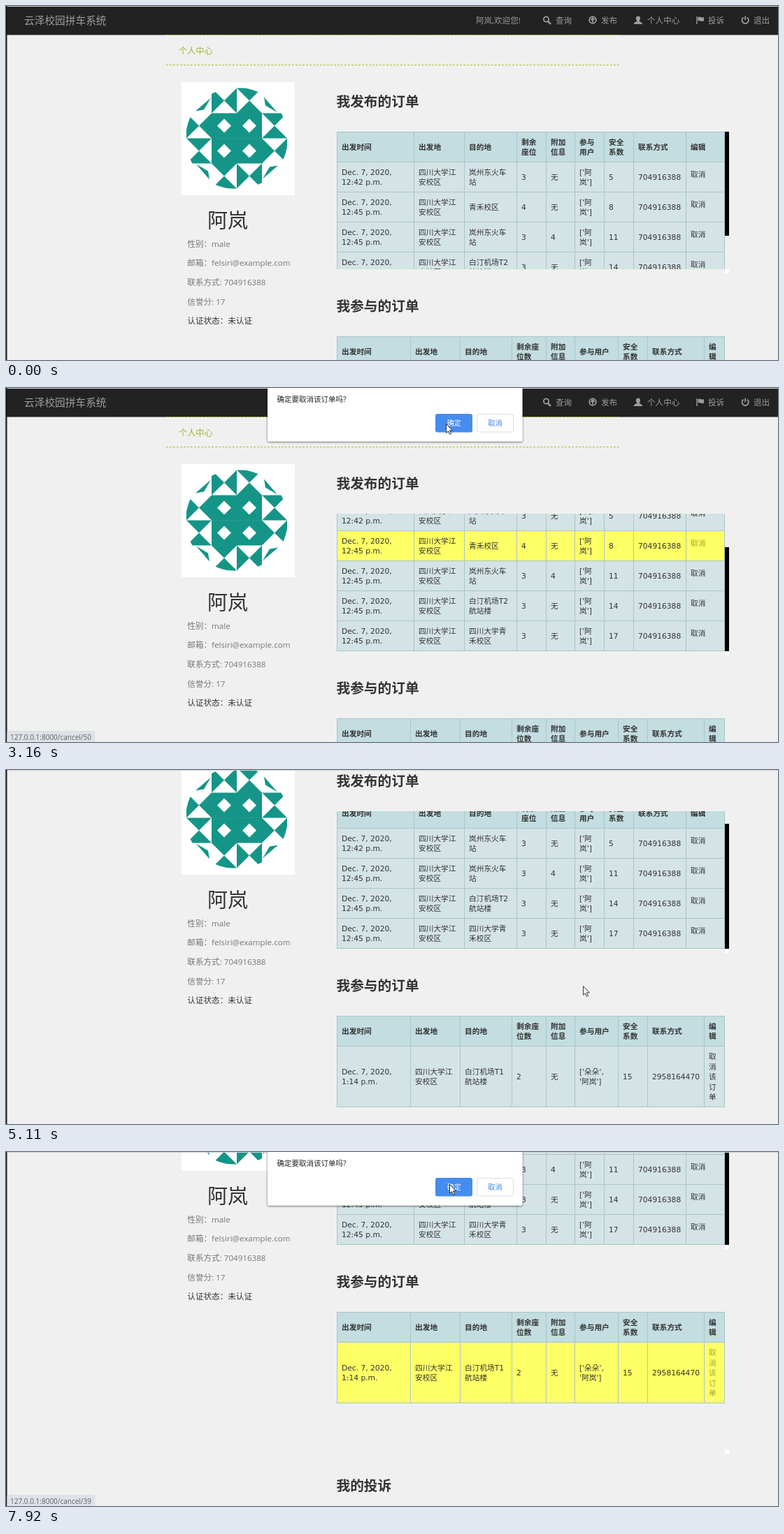
An HTML page for the animation above (8 s loop, 1104x507 px).

```html
<!DOCTYPE html>
<html lang="zh">
<head>
<meta charset="utf-8">
<title>个人中心</title>
<style>
html, body { margin: 0; width: 100%; height: 100%; overflow: hidden; background: #f0f0f0; }
svg { display: block; width: 1104px; height: 507px; }
text { font-family: "Open Sans", "Noto Sans CJK SC", sans-serif; white-space: pre; }
.cell { stroke: #a9c6c9; shape-rendering: crispEdges; }
.row .cell { fill: #d4e3e5; }
.head .cell { fill: #c3dde0; }
.row.hover .cell { fill: #ffff66; }
.row text, .head text { font-family: "DejaVu Sans", "Noto Sans CJK SC", sans-serif; fill: #333; }
.head text { font-weight: bold; }
.row text.lit { fill: #9aa82c; }
.icon { fill: none; stroke: #9d9d9d; stroke-width: 1.8; }
.solid { fill: #9d9d9d; stroke: none; }
</style>
</head>
<body>
<svg id="stage" viewBox="0 0 1104 507"></svg>
<script>
const ME = '阿岚', PHONE = '704916388';
const SPLIT = [`['${ME[0]}`, `${ME[1]}']`];
const CAMPUS = ['四川大学江', '安校区'];
const COLS1 = [473, 583, 655, 730, 772, 813, 855, 897, 972, 1027];
const COLS2 = [473, 578, 649, 723, 772, 813, 875, 917, 998, 1027];
const PAD = 7, ROW_H = 43, TOP = 180, VIEW_H = 197;
const TOP2 = 473, JOINED_Y = TOP2 + ROW_H, JOINED_H = 87;
const CONTACT = 7, EDIT = 8, JOINED = 6;

const text = (s, x, cy, size, fill, extra = '') =>
  `<text x="${x}" y="${cy + size * 0.37}" font-size="${size}" ${fill ? `fill="${fill}"` : ''} ${extra}>${
    s.replace(/&/g, '&amp;')}</text>`;
const rect = (x, y, w, h, fill, extra = '') =>
  `<rect x="${x}" y="${y}" width="${w}" height="${h}" fill="${fill}" ${extra}/>`;
const heading = (s, cy) => text(s, 472.5, cy, 19.7, '#333', 'font-weight="bold"');

function row(cols, y, h, cells, attrs, lift = 0) {
  const parts = cells.map((cell, i) => {
    const lines = [].concat(cell);
    const mid = y + h / 2 + 0.8 - (i === EDIT ? lift : 0);
    return `<rect class="cell" x="${cols[i] + 0.5}" y="${y + 0.5}" width="${cols[i + 1] - cols[i]}" height="${h}"/>` +
      lines.map((s, k) =>
        text(s, cols[i] + PAD, mid + (k - (lines.length - 1) / 2) * 14.4, 10.7, '', `data-col="${i}"`)).join('');
  });
  return `<g ${attrs}>${parts.join('')}</g>`;
}

const order = (time, to, seats, note, safety) =>
  [['Dec. 7, 2020,', time], CAMPUS, to, seats, note, SPLIT, safety, PHONE, '取消'];
const LATE = '12:45 p.m.';
const ORDERS = [
  order('12:42 p.m.', ['岚州东火车', '站'], '3', '无', '5'),
  order(LATE, '青禾校区', '4', '无', '8'),
  order(LATE, ['岚州东火车', '站'], '3', '4', '11'),
  order(LATE, ['白汀机场T2', '航站楼'], '3', '无', '14'),
  order(LATE, ['四川大学青', '禾校区'], '3', '无', '17')
];

const table1 = row(COLS1, TOP, ROW_H,
  ['出发时间', '出发地', '目的地', ['剩余', '座位'], ['附加', '信息'], ['参与', '用户'], ['安全', '系数'], '联系方式', '编辑'],
  'class="head"') +
  ORDERS.map((o, i) => row(COLS1, TOP + ROW_H * (i + 1), ROW_H, o, `class="row" id="r${i + 1}"`, 4)).join('');

const table2 = row(COLS2, TOP2, ROW_H,
  ['出发时间', '出发地', '目的地', ['剩余座', '位数'], ['附加', '信息'], '参与用户', ['安全', '系数'], '联系方式', ['编', '辑']],
  'class="head"') +
  row(COLS2, JOINED_Y, JOINED_H,
    [['Dec. 7, 2020,', '1:14 p.m.'], CAMPUS, ['白汀机场T1', '航站楼'], '2', '无',
      ["['朵朵',", `'${ME}']`], '15', '2958164470', [...'取消该订单']],
    `class="row" id="r${JOINED}"`);

// One quadrant of the avatar, turned four times around the centre.
const bowtie = 'l18 18-18 18zm36 0l-18 18 18 18z';
const quarter = `<path d="M36 0${bowtie}M0 36${bowtie}M13 33L35 14 25 31zM36 36h36.300v36.300H36z"/>` +
  '<path fill="#fff" d="M54 44l10 10-10 10-10-10z"/>';
const avatar = rect(251, 109, 162, 162, '#fff') +
  '<g clip-path="url(#disc)" fill="#159587">' +
  [0, 90, 180, 270].map(a => `<g transform="translate(330 189.5) rotate(${a}) translate(-72 -72)">${quarter}</g>`).join('') +
  '</g>';

const nav = rect(0, 0, 1104, 41.5, '#222') +
  text('云泽校园拼车系统', 26, 21, 14.7, '#9d9d9d') +
  [[ME + ',欢迎您!', 672], ['查询', 786], ['发布', 851], ['个人中心', 917], ['投诉', 1004], ['退出', 1069]]
    .map(([s, x]) => text(s, x, 20.8, 11.6, '#9d9d9d')).join('') +
  `<g class="icon">
    <circle cx="772.5" cy="19" r="3.6"/><path d="M775 21.8l4 4" stroke-width="2.4"/>
    <circle cx="839" cy="20" r="4.8"/><path d="M839 23.5v-6M836.3 19.8l2.7-2.7 2.7 2.7"/>
    <path class="solid" d="M904 14.5c4 0 3.6 5 1.6 6.8 0 1.6 4.6 1.6 4.6 4.7h-12.4c0-3.1 4.6-3.1 4.6-4.7-2-1.8-2.4-6.8 1.6-6.8z"/>
    <path d="M988 15v11" stroke-width="1.4"/><path class="solid" d="M989.5 16c3-1.5 4.5 1.5 8.5 0v5.5c-4 1.5-5.5-1.5-8.5 0z"/>
    <path d="M1054.5 16.5a4.7 4.7 0 1 0 5.4 0M1057.2 14.5v5.5"/>
  </g>`;

const dashed = y => `<path d="M229 ${y}H877" stroke="#a5c62b" stroke-dasharray="3 2"/>`;
const side = ['性别：male', '邮箱：felsiri@example.com', '联系方式: ' + PHONE, '信誉分: 17', '认证状态：未认证']
  .map((s, i) => text(s, 259.3, 340.5 + 27.6 * i, 11.6, i < 4 ? '#777' : '#333')).join('');

const dialog = '<g id="dialog">' +
  rect(374, -6, 364.5, 82.5, '#fff', 'rx="2" filter="url(#shadow)"') +
  text('确定要取消该订单吗?', 387.5, 16, 10.5, '#222') +
  rect(614, 37, 53, 26.5, '#458cf1', 'rx="3"') + text('确定', 630.7, 50.3, 10.2, '#fff') +
  rect(673.5, 37.5, 52, 25.5, '#fff', 'rx="3" stroke="#dadce0"') + text('取消', 689.3, 50.3, 10.2, '#3a80e8') +
  '</g>';

document.getElementById('stage').innerHTML = `
  <defs>
    <clipPath id="view"><rect x="473" y="${TOP}" width="555" height="${VIEW_H}"/></clipPath>
    <clipPath id="disc"><circle cx="330" cy="189.5" r="73"/></clipPath>
    <filter id="shadow" x="-5%" y="-20%" width="110%" height="150%">
      <feDropShadow dx="0" dy="1" stdDeviation="1.5" flood-opacity=".6"/>
    </filter>
  </defs>
  ${rect(0, 0, 1104, 507, '#f0f0f0')}
  <g id="page">
    ${nav}${dashed(41.5)}${dashed(84.5)}
    ${text('个人中心', 247, 64, 12.2, '#9aba2f')}
    ${avatar}${text(ME, 288, 307, 29, '#333')}${side}
    ${heading('我发布的订单', 137)}${heading('我参与的订单', 429.5)}${heading('我的投诉', 722)}
    <g clip-path="url(#view)"><g id="list">${table1}</g></g>
    ${rect(1028, TOP, 6, 150, '#000', 'id="thumb"')}
    ${rect(1028, 377, 6, 6, '#fff')}${rect(1028, 670, 6, 6, '#fff')}
    ${table2}
  </g>
  ${rect(0, 0, 1104, 1, '#d2d2d2')}${rect(0, 0, 1.5, 507, '#111')}
  <g id="status">${rect(1.5, 491, 307, 17, '#dee1e6', 'rx="2" id="bar"')}${text('', 6, 500, 10, '#5f6368', 'id="url"')}</g>
  ${dialog}
  <g id="cursor" stroke="#222" fill="#fff" stroke-linejoin="round">
    <path id="arrow" stroke-width=".9" d="M.5 .5V13.3L3.4 10.6 5.4 15.3 7.5 14.4 5.5 9.8H9.3z"/>
    <path id="hand" d="M-1.500 10V1.500c0-2 2.700-2 2.700 0V7c.5-1 2.300-.8 2.500 .3 .7-.8 2.200-.5 2.400 .7 .8-.6 2.100-.1 2.100 1.100v4.400c0 2-1.200 3-1.500 5.500H-.5c-.5-2-3.700-5-4.500-7.500-.4-1.700 1.400-2.400 2.300-1.200z"/>
  </g>`;

const LOOP = 8000, ENTER = 70, RELOAD = 3600;
const LAG = 150; // hover reacts this long after the pointer
// pointer moves: start, end, x, y
const MOVES = [
  [0, 1, 1073, 475], [ENTER, 800, 934, 287], [1150, 1650, 992, 220], [2550, 3050, 629, 51],
  [3520, 4110, 757, 225], [4310, 4650, 825, 309], [5320, 5720, 1000, 300], [5950, 6290, 1006, 303],
  [6420, 6700, 1013, 331], [7080, 7800, 639, 50], [7860, 7920, 634, 46]
];
const DIALOGS = [[2450, 3480], [7200, LOOP]];

const $ = id => document.getElementById(id);
const show = (id, on) => { $(id).style.display = on ? '' : 'none'; };
const shift = (id, x, y) => $(id).setAttribute('transform', `translate(${x} ${y})`);

function ramp(t, from, to) {
  const u = Math.min(1, Math.max(0, (t - from) / (to - from)));
  return u * u * (3 - 2 * u);
}
const pointer = t => MOVES.reduce(([x, y], [from, to, nx, ny]) => {
  const k = ramp(t, from, to);
  return [x + (nx - x) * k, y + (ny - y) * k];
}, MOVES[0].slice(2));
const pageScroll = t => 121 * ramp(t, 4700, 4900) + 123 * ramp(t, 5200, 5380);
const listScroll = t => t < RELOAD
  ? 25 * ramp(t, 870, 930) + 37 * ramp(t, 960, 1090)
  : 19 * ramp(t, 4500, 4620);

// The row under the pointer, and the column when it is on a link.
function hit(t) {
  const [x, top] = pointer(t);
  const y = top + pageScroll(t);
  if (t < ENTER || x < COLS1[0] || x > COLS1[9]) return {};
  let id, mid, cols = COLS1, h = ROW_H;
  if (y > TOP && y < TOP + VIEW_H) {
    const at = Math.floor((y - TOP + listScroll(t)) / ROW_H);
    mid = TOP - listScroll(t) + (at + 0.5) * ROW_H;
    id = t >= RELOAD && at > 1 ? at + 1 : at;
  } else if (y > JOINED_Y && y < JOINED_Y + JOINED_H) {
    id = JOINED;
    cols = COLS2;
    h = JOINED_H;
    mid = JOINED_Y + h / 2;
  }
  const onText = Math.abs(y - mid) < h / 2 - 14;
  const link = onText && [CONTACT, EDIT].find(c => x > cols[c] + PAD && x < cols[c + 1]);
  return { id, link };
}

function draw(t) {
  const inner = Math.round(listScroll(t));
  const removed = t >= RELOAD;
  const full = ROW_H * (removed ? 5 : 6) + 1;
  shift('page', 0, -Math.round(pageScroll(t)));
  shift('list', 0, -inner);
  show('r2', !removed);
  for (const id of ['r3', 'r4', 'r5']) shift(id, 0, removed ? -ROW_H : 0);
  $('thumb').setAttribute('y', Math.ceil(TOP + inner * VIEW_H / full));
  $('thumb').setAttribute('height', Math.floor(VIEW_H * VIEW_H / full));

  // An open dialog freezes the hover underneath it.
  const open = DIALOGS.find(([from, to]) => t >= from && t < to);
  const { id, link } = hit((open ? open[0] : t) - LAG);
  for (let i = 1; i <= JOINED; i++) {
    const r = $('r' + i);
    r.classList.toggle('hover', i === id);
    r.querySelectorAll('text').forEach(e =>
      e.classList.toggle('lit', i === id && +e.dataset.col === link));
  }

  show('status', link);
  $('url').textContent = link === CONTACT
    ? `wpa.qq.com/msgrd?v=3&uin=${PHONE}&site=qq&menu=yes`
    : `127.0.0.1:8000/cancel/${id === JOINED ? 39 : 50}`;
  $('bar').setAttribute('width', link === CONTACT ? 307 : 126);
  show('dialog', open);

  const hand = link === EDIT && !open;
  show('cursor', t >= ENTER);
  show('hand', hand);
  show('arrow', !hand);
  shift('cursor', ...pointer(t).map(Math.round));
}

const start = performance.now();
function tick() {
  draw((performance.now() - start) % LOOP);
  requestAnimationFrame(tick);
}
tick();
</script>
</body>
</html>
```
